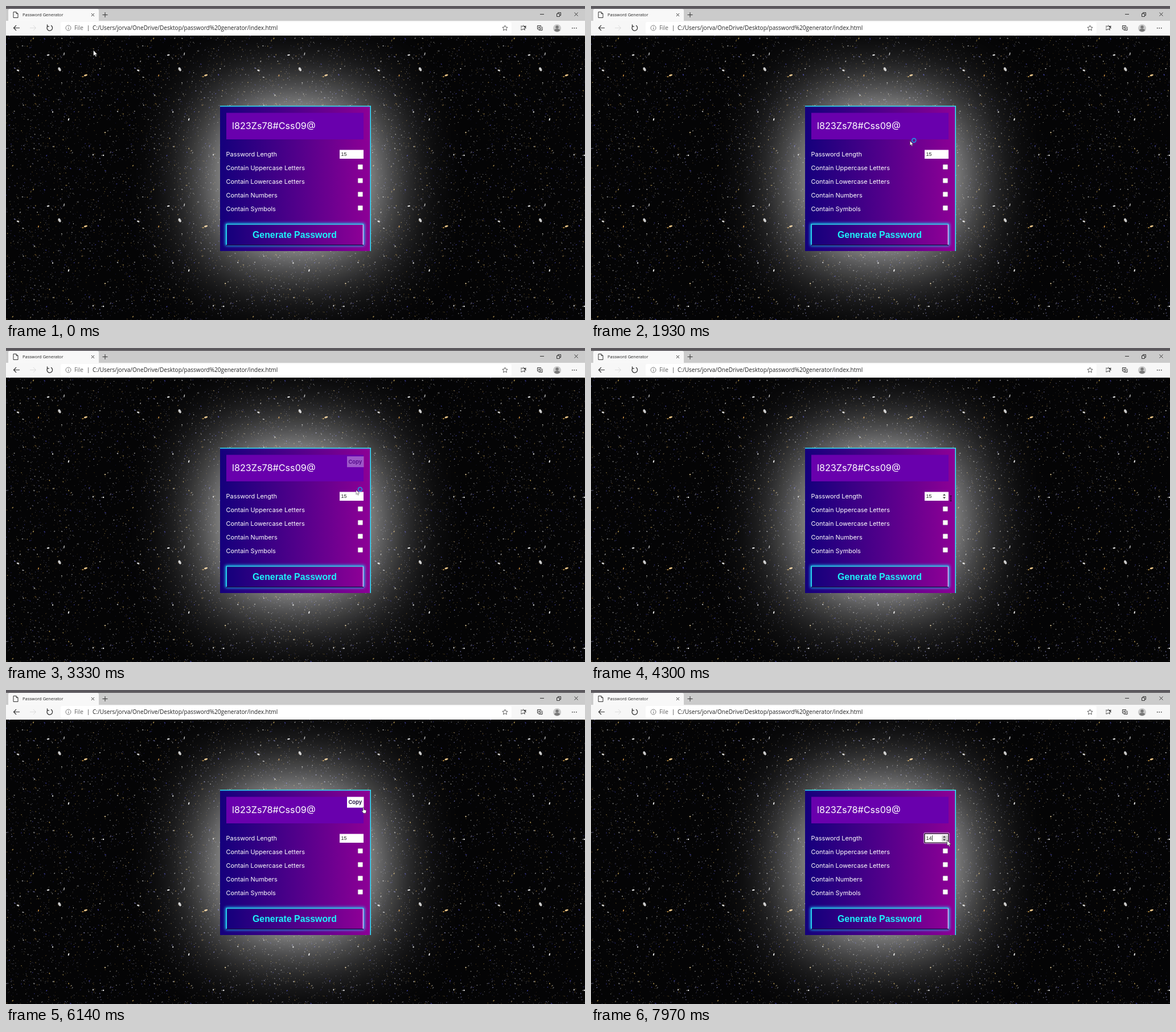
These frames come from a looping animation (1017x551 px, 8 s). An HTML page with a canvas:

```html
<!DOCTYPE html>
<html lang="en">
<head>
<meta charset="utf-8">
<title>Password Generator</title>
<style>
  html, body { margin: 0; width: 100%; height: 100%; overflow: hidden; background: #000; }
  canvas, svg { position: absolute; left: 0; top: 0; width: 1017px; height: 551px; }
  .ui { font-family: "Open Sans", sans-serif; fill: #222; }
  .card { font-family: Inter, sans-serif; fill: #fff; }
  .arial { font-family: "Liberation Sans", Arial, sans-serif; }
  .line { fill: none; stroke: #333; stroke-width: 1; }
</style>
</head>
<body>
<canvas id="sky" width="1017" height="551"></canvas>
<svg viewBox="0 0 1017 551">
  <defs>
    <linearGradient id="violet">
      <stop offset="0" stop-color="#14007c"/>
      <stop offset=".5" stop-color="#50008a"/>
      <stop offset="1" stop-color="#8e0096"/>
    </linearGradient>
    <filter id="halo" x="-1" y="-1" width="3" height="3" color-interpolation-filters="sRGB"><feGaussianBlur stdDeviation="70"/></filter>
    <filter id="neon" x="-.2" y="-.6" width="1.4" height="2.2" color-interpolation-filters="sRGB"><feGaussianBlur stdDeviation="2.6"/></filter>
    <clipPath id="page"><path d="M0 52H1017V551H0z"/></clipPath>
  </defs>

  <g clip-path="url(#page)"><rect x="376" y="175" width="265" height="255" fill="#fff" filter="url(#halo)"/></g>

  <!-- browser window -->
  <path d="M0 0H1017V5H0z" fill="#5b585d"/>
  <path d="M0 5H1017V27H0z" fill="#cbcbcb"/>
  <path d="M0 26H1017V52H0z" fill="#f7f7f7"/>
  <path d="M4 27V8q0-3 3-3H160q3 0 3 3V27z" fill="#f8f8f8"/>
  <rect x="96" y="28" width="792" height="21" rx="3" fill="#fff"/>
  <g class="line">
    <path d="M13 10.500h5l3 3V20.500H13zM18 10.500v3h3"/>
    <path d="M150 13l5 5m0-5l-5 5M169.500 15.500h9M174 11v9"/>
    <path d="M938 14.500h7M967.500 13.500h5v5h-5zM969.500 13v-1.500h5v5H973M998.500 11.500l6 6m0-6l-6 6"/>
    <path d="M24 38.500H13.500m4.500-4.500l-4.500 4.500 4.500 4.500" stroke-width="1.200"/>
    <path d="M42 38.500h10.500m-4.500-4.500l4.500 4.500-4.500 4.500" stroke="#ddd"/>
    <path d="M73.500 35a4.800 4.800 0 1 0 5.500-.8M72.500 32.500v3.300h3.300" stroke-width="1.300"/>
    <g stroke="#777"><circle cx="109.500" cy="38.500" r="4.500"/><path d="M109.500 38v3M109.500 36v1M144.500 34v10"/></g>
    <path d="M876.500 34l1.400 3 3.200.4-2.300 2.200.6 3.200-2.900-1.600-2.900 1.600.6-3.200-2.300-2.200 3.200-.4z" stroke-width=".8"/>
    <path d="M904 35.500h4m2 0h4M904 38.500h2m5 0h3M904 41.500h2M908.500 33.500l1.300 3 3.200.3-2.400 2.100.7 3.200-2.800-1.700-2.800 1.700"/>
    <path d="M933.500 34.500h6v6h-6zM935.500 42.500h6.500v-6M936.500 36v3m-1.500-1.500h3"/>
  </g>
  <circle cx="968" cy="39" r="7" fill="#c9c9c9"/>
  <circle cx="968" cy="37" r="2.700" fill="#777"/><path d="M963 43q0-3 5-3t5 3q-5 4-10 0" fill="#777"/>
  <path d="M994 38h1.500v1.500H994zM997.500 38h1.500v1.500h-1.500zM1001 38h1.500v1.500H1001z" fill="#333"/>
  <g class="ui">
    <text x="29" y="18" font-size="7.500">Password Generator</text>
    <text x="120" y="42" font-size="10" fill="#666">File</text>
    <text x="152" y="42" font-size="10.050">C:/Users/jorva/OneDrive/Desktop/password%20generator/index.html</text>
  </g>

  <!-- generator card -->
  <path d="M376 175H641V430H376z" fill="url(#violet)"/>
  <path d="M376 175.800H640.200V430" fill="none" stroke="#2ee6f5" stroke-width="1.600"/>
  <path d="M387 187.500H628V234H387z" fill="#6900ad"/>
  <g class="card">
    <text x="397" y="215.500" font-size="16.200">l823Zs78#Css09@</text>
    <g id="labels" font-size="10.950"></g>
    <g id="copy">
      <path d="M599 187.500H628.500V206.500H599z"/>
      <text x="601.500" y="200" font-size="9.300" font-weight="600" fill="#1b0a3c">Copy</text>
    </g>
  </g>

  <g class="arial">
    <path d="M586 252.500H628V268H586z" fill="#fff"/>
    <g id="focus" fill="none">
      <rect x="584.800" y="250.800" width="44.400" height="18.400" rx="1.500" stroke="#fff" stroke-width=".8"/>
      <rect x="586" y="252" width="42" height="16" rx="1" stroke="#111" stroke-width="1.200"/>
      <path d="M616 255H627V266H616z" fill="#d2d2d2"/>
      <path d="M599.500 255v10" stroke="#111" stroke-width=".8"/>
    </g>
    <text id="length" x="588.500" y="263" font-size="9" fill="#222"></text>
    <path id="spinner" d="M618 259l2.500-3 2.500 3zM618 261.500l2.500 3 2.500-3z" fill="#444"/>

    <path d="M385.500 381.500H629.500V420.500H385.500z" fill="#19d8ff" filter="url(#neon)"/>
    <path d="M387 382H628V420H387z" fill="url(#violet)"/>
    <path d="M387 419.500H628" stroke="#1c0748" stroke-width="1.500"/>
    <path d="M627.300 419V383" stroke="#d5bdf5" stroke-width="1.500"/>
    <path d="M387.300 419V383H628" fill="none" stroke="#2ee6f5" stroke-width="1.400"/>
    <text x="507" y="406.500" font-size="15.850" font-weight="bold" text-anchor="middle" fill="#1cf3fb">Generate Password</text>
  </g>

  <!-- pointers, each with its hot spot at 0,0 -->
  <g id="pointer">
    <g id="arrow"><path d="M0 0v10l2.300-2 1.700 3.500 1.500-.7-1.600-3.300h3z" fill="#fff" stroke="#222" stroke-width=".6"/></g>
    <g id="busy">
      <path d="M0 1v8l1.800-1.600 1.400 2.900 1.300-.6-1.300-2.700h2.600z" fill="#fff" stroke="#222" stroke-width=".5"/>
      <circle cx="7" cy="0" r="3.400" fill="none" stroke="#2196e3" stroke-width="1.700"/>
    </g>
    <path id="ibeam" d="M-1.500-4.500h3M0-4.500v9M-1.500 4.500h3" fill="none" stroke="#14051c"/>
    <path id="hand" d="M0 0q1-1 1.700 0v4l3.300.8q1 .4.800 1.800l-.8 3.600H.800L-2 6.500q.3-1.500 2 0z" fill="#fff" stroke="#222" stroke-width=".6"/>
  </g>
</svg>
<script>
const $ = id => document.getElementById(id);
const DURATION = 8000;

// Night sky: one seeded tile, repeated.
function drawSky() {
  const ctx = $("sky").getContext("2d");
  const tileW = 211.2, tileH = 265;
  let seed = 77;
  const random = () => (seed = seed * 16807 % 2147483647) / 2147483647;
  const tints = ["#7777a8", "#3d3d94", "#a58a4b", "#8c8c8c", "#5c5c70", "#b7b7b0", "#6c5329"];
  const stars = Array.from({ length: 1250 }, () => {
    const size = 0.42 + 0.6 * random() ** 4;
    return [random() * tileW, random() * tileH, size, size * (1 + random() * 0.8),
      random() * 3, tints[Math.floor(random() * tints.length)], 0.3 + 0.65 * random()];
  });
  // x, y, radii, angle, colour
  const bright = [
    [94, 59, 2.2, 3.6, -0.5, "#c9c9c9"], [140, 69.5, 3.2, 1.5, -0.3, "#e0bd83"],
    [135, 72, 1.4, 1.1, 0, "#b88a3d"], [74, 34, 2.4, 1.1, -0.1, "#eee"],
    [102, 32, 0.8, 2.8, 0.2, "#bbb"], [21, 61, 2.4, 1.3, 0.4, "#ddd"],
    [110, 147, 1.1, 2.4, 0.3, "#ddd"], [57, 70, 1, 1.9, 0.2, "#b9823c"],
    [165, 58, 1.1, 1.1, 0, "#aaa"], [30, 73, 1.8, 0.8, 0.2, "#aaa"],
    [82, 134, 1.2, 1.4, 0, "#bbb"], [196, 133, 1.3, 1.1, 0, "#aaa"],
    [153, 209, 1, 1.6, 0.2, "#ccc"], [171, 210, 1.3, 1.2, 0, "#ddd"],
    [174, 170, 1.1, 1.3, 0, "#c8b485"], [29, 18, 1.4, 0.8, 0, "#aaa"]
  ].map(star => [...star, 1]);
  ctx.fillStyle = "#040405";
  ctx.fillRect(0, 0, 1017, 551);
  for (let top = 52; top < 551; top += tileH)
    for (let left = 0; left < 1017; left += tileW)
      for (const [x, y, rx, ry, angle, color, alpha] of [...stars, ...bright]) {
        ctx.globalAlpha = alpha;
        ctx.fillStyle = color;
        ctx.beginPath();
        ctx.ellipse(left + x, top + y, rx, ry, angle, 0, 7);
        ctx.fill();
      }
}

const rows = ["Password Length", "Contain Uppercase Letters", "Contain Lowercase Letters",
  "Contain Numbers", "Contain Symbols"];
$("labels").innerHTML = rows.map((label, i) => {
  const y = 264 + 24 * i;
  const box = i ? `<rect x="618.200" y="${y - 9.7}" width="8.300" height="8.300" rx=".8" stroke="#aaa" stroke-width=".5"/>` : "";
  return `<text x="386.500" y="${y}">${label}</text>${box}`;
}).join("");

// time, x, y, pointer kind
const path = [
  [0, 153.5, 77.500, "arrow"], [730, 153.5, 77.500, "arrow"], [800, 157, 81, "busy"],
  [960, 157, 81, "busy"], [1360, 450, 243, "busy"], [1770, 545, 240, "busy"],
  [2370, 602, 224, "busy"], [2750, 612, 214, "busy"], [3150, 616, 236, "busy"],
  [3500, 614, 259, "ibeam"], [4300, 632, 264, "ibeam"], [4400, 636, 256, "busy"],
  [4850, 632, 212, "busy"], [5240, 642, 206, "busy"], [5550, 638, 207, "busy"],
  [5850, 627, 206, "hand"], [6500, 627, 206, "hand"], [6800, 626, 226, "busy"],
  [7150, 622, 258, "arrow"], [7500, 625.5, 263.500, "arrow"], [DURATION, 625.5, 263.500, "arrow"]
];
const copyFade = [[0, 0], [2400, 0], [2600, 1], [3200, 1], [3400, 0], [4850, 0], [5050, 1],
  [5190, 1], [5240, 0.8], [5290, 0.65], [5500, 1], [6850, 1], [7050, 0], [DURATION, 0]];

function sample(keys, t) {
  const i = Math.max(1, keys.findIndex(key => key[0] > t));
  const a = keys[i - 1], b = keys[i];
  const k = (t - a[0]) / (b[0] - a[0]);
  return a.map((v, j) => typeof v === "number" ? v + (b[j] - v) * k : v);
}

const show = (id, visible) => $(id).setAttribute("visibility", visible ? "visible" : "hidden");

function frame() {
  const t = performance.now() % DURATION;
  const [, x, y, kind] = sample(path, t);
  const opacity = sample(copyFade, t)[1];
  const clicked = t >= 7700;
  $("pointer").setAttribute("transform", `translate(${x} ${y})`);
  for (const id of ["arrow", "busy", "ibeam", "hand"]) show(id, id === kind);
  $("copy").setAttribute("opacity", opacity);
  $("copy").setAttribute("transform", `translate(0 ${(1 - opacity) * 4})`);
  show("spinner", kind === "ibeam" || t >= 7150);
  show("focus", clicked);
  $("length").textContent = clicked ? "14" : "15";
  requestAnimationFrame(frame);
}

drawSky();
frame();
</script>
</body>
</html>
```
